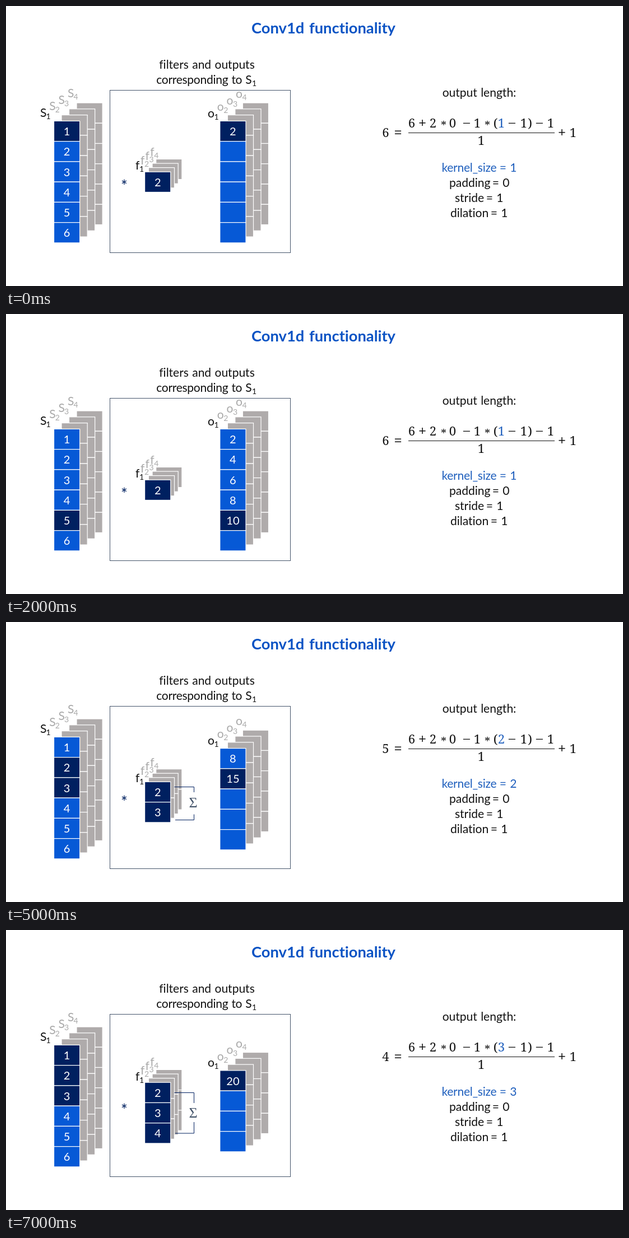
An HTML page that plays this animation: 1101x500 px, repeating every 8000 ms.

```html
<!DOCTYPE html>
<html lang="en">
<head>
<meta charset="utf-8">
<title>Conv1d functionality</title>
<style>
  html, body { margin: 0; width: 100%; height: 100%; overflow: hidden; background: #fff; }
  svg { display: block; width: 1101px; height: 500px; }
  text {
    font: 21px Lato, "Open Sans", sans-serif;
    font-variant-ligatures: none;
    word-spacing: 1px;
    white-space: pre;
  }
  .title { font-size: 27.3px; font-weight: 700; word-spacing: 2px; }
  .tight { letter-spacing: -.27px; }
  .sub { font-size: 14px; }
  .digit { font-size: 20px; }
  .times { font-size: 28px; }
  .math { font: 22px "Noto Serif", serif; }
  .op { font: 26px "Noto Serif", serif; }
  .star { font: 20px "Noto Serif", serif; }
  .sum { font: 26px "Liberation Serif", serif; }
</style>
</head>
<body>
<svg id="stage" viewBox="0 0 1101 500"></svg>
<script>
const BLUE = '#0659d6', NAVY = '#002060', GREY = '#afabab', PALE = '#a9a9a9';
const LINK = '#1f5fbd', TITLE = '#0a53c4', SLATE = '#44546a', INK = '#111';
const CELL_W = 46.2, CELL_H = 36.25, LOOP = 8000;

// start time, kernel size, step
const STEPS = [
  [0, 1, 0], [500, 1, 1], [1000, 1, 2], [1500, 1, 3], [2000, 1, 4], [2500, 1, 5],
  [3000, 2, 0], [5000, 2, 1], [5500, 2, 2], [6000, 2, 3], [6500, 2, 4],
  [7000, 3, 0]
];

const LAYOUT = {
  1: { outY: 205.4, filterY: 296.2, label: 292, backLabel: 283, out: [2, 4, 6, 8, 10, 12] },
  2: { outY: 225.6, filterY: 285.4, label: 286, backLabel: 273, out: [8, 15, 18, 23, 28],
       bracket: [294.5, 304, 343.5, 353.5], sumY: 330.5 },
  3: { outY: 250.9, filterY: 272.2, label: 269, backLabel: 258, out: [20],
       bracket: [290.5, 309, 343, 363], sumY: 335 }
};

const text = (x, y, s, { fill = INK, anchor = 'middle', cls = '' } = {}) =>
  `<text x="${x}" y="${y}" fill="${fill}" text-anchor="${anchor}" class="${cls}">${s}</text>`;

const cell = (x, y, fill) =>
  `<rect x="${x}" y="${y}" width="${CELL_W}" height="${CELL_H}" fill="${fill}" stroke="#fff" stroke-width="1.2"/>`;

function column(x, y, count, fill, value = () => '') {
  let s = '';
  for (let i = 0; i < count; i++) {
    const top = y + i * CELL_H;
    s += cell(x, top, fill(i));
    s += text(x + CELL_W / 2, top + 25.6, value(i), { fill: '#fff', cls: 'digit' });
  }
  return s;
}

function stack(x, y, count, dx, dy, fill, value) {
  let s = '';
  for (let d = 3; d > 0; d--) s += column(x + d * dx, y - d * dy, count, () => GREY);
  return s + column(x, y, count, fill, value);
}

function label(x, y, name, index, subDx) {
  const fill = index === 1 ? INK : PALE;
  return text(x, y, name, { fill, anchor: 'start' }) +
         text(x + subDx, y + 4, index, { fill, anchor: 'start', cls: 'sub' });
}

function labels(name, x, y, dx, dy, subDx) {
  let s = '';
  for (let i = 3; i >= 0; i--) s += label(x + i * dx, y - i * dy, name, i + 1, subDx);
  return s;
}

function filterLabels(L) {
  let s = '';
  for (let i = 4; i > 1; i--) s += label(240 + (i - 2) * 8.6, L.backLabel - (i - 2) * 7.7, 'f', i, 7);
  return s + label(231, L.label, 'f', 1, 7);
}

function bracket(L) {
  if (!L.bracket) return '';
  const [a, b, c, d] = L.bracket;
  return `<path d="M300.5 ${a}H335.5V${b}M335.5 ${c}V${d}H302" fill="none" stroke="${NAVY}"/>` +
         text(334, L.sumY, 'Σ', { fill: SLATE, cls: 'sum' });
}

function formula(k) {
  const math = (x, y, s, fill = INK) => text(x, y, s, { fill, cls: 'math' });
  const op = (x, y, s) => text(x, y + 1.5, s, { cls: 'op' });
  const star = x => text(x, 220, '*', { cls: 'star' });
  const digits = [[724, 6], [762, 2], [797, 0], [841, 1], [873.5, '('],
                  [924, 1], [935, ')'], [972, 1]];
  const ops = [[743, '+'], [822, '−'], [903, '−'], [952, '−']];
  return math(677.5, 233.5, 7 - k) + op(699.5, 233.5, '=') +
    digits.map(([x, s]) => math(x, 216.5, s)).join('') +
    ops.map(([x, s]) => op(x, 216.5, s)).join('') +
    star(781) + star(859) + math(884, 216.5, k, LINK) +
    `<path d="M718 226.5H979" stroke="${INK}" stroke-width="1.2"/>` +
    math(848, 248, 1) + op(992, 233.5, '+') + math(1012, 233.5, 1);
}

function param(left, right, y, name, value, fill = INK, cls = '') {
  return text(left, y, name, { fill, anchor: 'start', cls }) +
         text(right, y, '= ' + value, { fill, anchor: 'end' });
}

function scene(k, step) {
  const L = LAYOUT[k];
  const inWindow = i => i >= step && i < step + k ? NAVY : BLUE;
  return text(566.5, 49, 'Conv1d functionality', { fill: TITLE, cls: 'title' }) +
    text(358.5, 112, 'filters and outputs') +
    text(438.5, 139, 'corresponding to S', { anchor: 'end', cls: 'tight' }) +
    text(439, 143, 1, { anchor: 'start', cls: 'sub' }) +
    `<rect x="185.5" y="150.5" width="322" height="290" fill="none" stroke="${SLATE}"/>` +
    stack(85.5, 205.4, 6, 13.5, 10.8, inWindow, i => i + 1) +
    labels('S', 61, 198, 16.3, 11.7, 10.5) +
    text(211, 332, '*', { fill: NAVY, cls: 'times' }) +
    stack(247.6, L.filterY, k, 6.7, 7.6, () => NAVY, i => i + 2) +
    filterLabels(L) + bracket(L) +
    stack(381.8, L.outY, 7 - k, 13.5, 10.8, i => i === step ? NAVY : BLUE,
          i => i <= step ? L.out[i] : '') +
    labels('o', 360, L.outY - 6.6, 16.7, 11.6, 11.5) +
    text(844.5, 162, 'output length:') + formula(k) +
    param(777.5, 911.5, 296, 'kernel_size', k, LINK, 'tight') +
    param(791, 898.5, 322.5, 'padding', 0) +
    param(801, 887.5, 350, 'stride', 1) +
    param(793, 895.5, 377, 'dilation', 1);
}

const stage = document.getElementById('stage');
let shown = null;

function draw() {
  const t = performance.now() % LOOP;
  const now = STEPS.findLast(s => s[0] <= t);
  if (now !== shown) {
    shown = now;
    stage.innerHTML = scene(now[1], now[2]);
  }
  requestAnimationFrame(draw);
}
draw();
</script>
</body>
</html>
```
